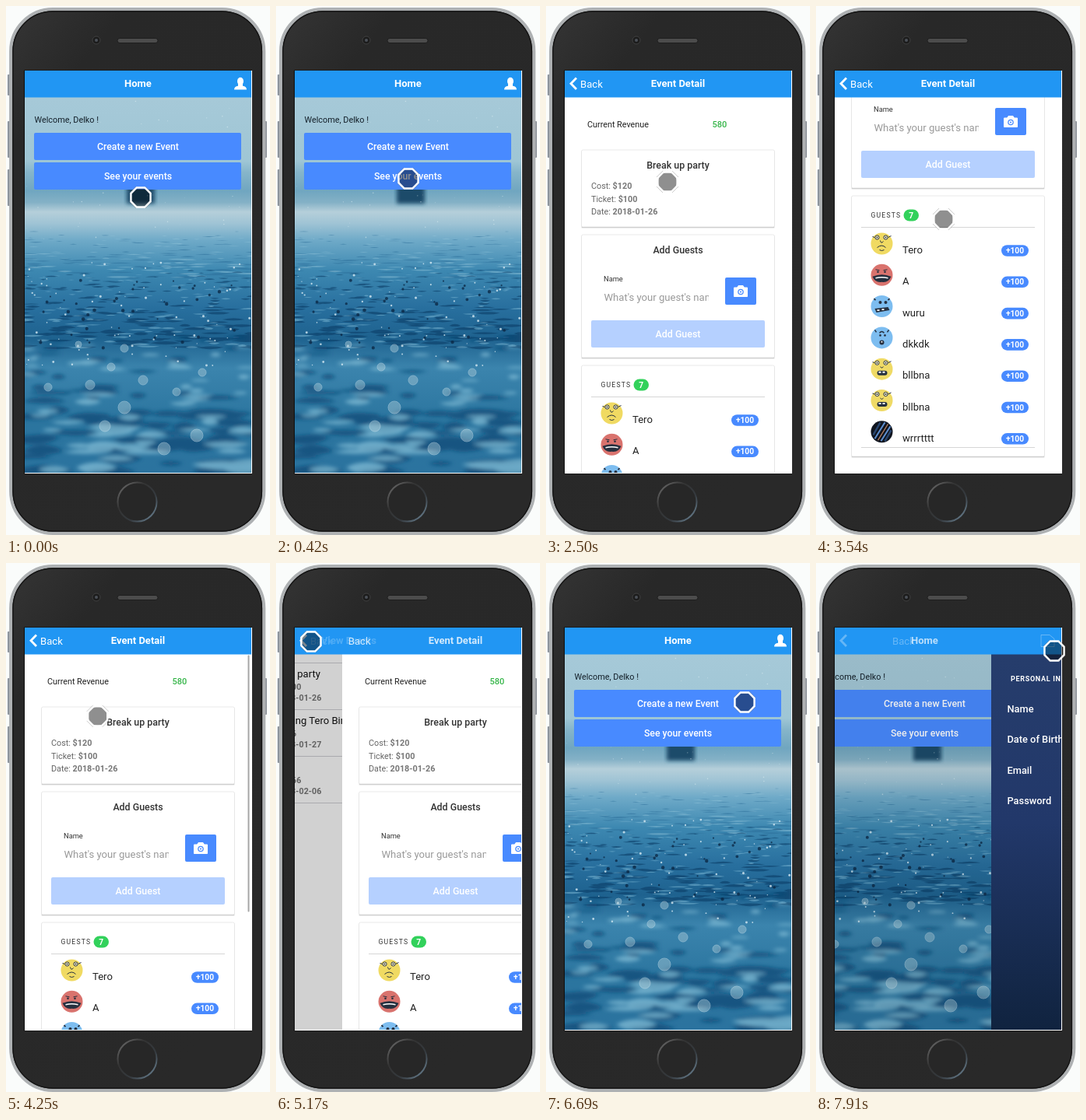
Animation of 339x680 px, one loop 8000 ms. Source, as an HTML page:

```html
<!DOCTYPE html>
<html lang="en">
<head>
<meta charset="utf-8">
<title>Event app</title>
<style>
html, body { margin: 0; width: 100%; height: 100%; overflow: hidden; background: #fafcfb; }
svg { display: block; }
text { font-family: Roboto, "Open Sans", sans-serif; }
</style>
</head>
<body>
<svg id="stage" width="339" height="680" viewBox="0 0 339 680"></svg>
<script>
const BLUE = '#488aff', BAR = '#2196f3', WIDTH = 291;

// ---------- drawing helpers ----------
const text = (x, y, str, size, fill = '#222', weight = 400, extra = '') =>
  `<text x="${x}" y="${y}" font-size="${size}" fill="${fill}" font-weight="${weight}" ${extra}>${str}</text>`;
const mid = (x, y, str, size, fill, weight) => text(x, y, str, size, fill, weight, 'text-anchor="middle"');
const rect = (x, y, w, h, fill, r = 0, extra = '') =>
  `<rect x="${x}" y="${y}" width="${w}" height="${h}" fill="${fill}" rx="${r}" ${extra}/>`;
const circle = (x, y, r, fill, extra = '') => `<circle cx="${x}" cy="${y}" r="${r}" fill="${fill}" ${extra}/>`;
const path = (d, fill, extra = '') => `<path d="${d}" fill="${fill}" ${extra}/>`;
const line = (d, color, width = 1) => path(d, 'none', `stroke="${color}" stroke-width="${width}"`);
const pair = (x, y, label, value) =>
  text(x, y, `${label}: <tspan font-weight="700" fill="#777">${value}</tspan>`, 10.8, '#666');
const stops = list => list.map(([at, color]) => `<stop offset="${at}" stop-color="${color}"/>`).join('');

let seed = 7;
const rand = (a = 0, b = 1) => {
  seed = (seed * 16807) % 2147483647;
  return a + (b - a) * seed / 2147483647;
};
const many = (n, make) => Array.from({ length: n }, make).join('');

// ---------- photo of rain on water ----------
const ripples = (n, y0, y1, width, height) => many(n, () => {
  const x = rand(20, 320), u = rand(), y = y0 + (y1 - y0) * u;
  const w = width * rand(0.4, 1.1) * (0.5 + u), h = height * rand(0.4, 1) * (0.5 + u);
  const tilt = h * rand(-0.5, 0.5);
  return `M${x - w},${y}Q${x},${y - h + tilt} ${x + w},${y}Q${x},${y + h + tilt} ${x - w},${y}`;
});
const dots = (n, y0, y1, r0, r1) => many(n, () => {
  const x = rand(26, 313), y = rand(y0, y1), r = rand(r0, r1);
  return `M${x - r},${y}a${r},${r} 0 1 0 ${2 * r},0a${r},${r} 0 1 0 ${-2 * r},0`;
});
const bokeh = [[152, 516, 8], [127, 540, 7], [203, 569, 8], [245, 552, 8], [108, 487, 6], [252, 471, 5],
  [176, 481, 6], [219, 496, 5], [93, 435, 4], [152, 440, 5], [54, 490, 5], [135, 464, 5]];

const photo = () =>
  rect(24, 117, WIDTH, 484, 'url(#water)') +
  `<g filter="url(#soft)">${rect(155, 208, 36, 46, '#1d4b6b')}</g>` +
  path(dots(60, 122, 300, 0.3, 0.8), '#e8f5f8', 'opacity=".5"') +
  `<g filter="url(#haze)">` +
  path(ripples(90, 290, 350, 13, 1.6), '#2a6d98', 'opacity=".5"') +
  path(ripples(75, 295, 350, 12, 1.6), '#a3cfe2', 'opacity=".4"') +
  path(ripples(150, 340, 440, 14, 3.2), '#0a3c66', 'opacity=".6"') +
  path(ripples(110, 345, 440, 10, 2.2), '#79b4d1', 'opacity=".55"') + '</g>' +
  `<g filter="url(#soft)">` +
  path(ripples(75, 425, 600, 28, 10), '#0d4a77', 'opacity=".75"') +
  path(ripples(60, 430, 600, 24, 9), '#86c0d9', 'opacity=".7"') + '</g>' +
  path(dots(40, 350, 440, 1, 2.4), '#0a2440', 'opacity=".75"') +
  path(dots(75, 330, 465, 0.5, 1.6), '#e0f1f7', 'opacity=".75"') +
  `<g filter="url(#haze)">` + bokeh.map(([x, y, r]) =>
    circle(x, y, r, '#b3cfda', 'opacity=".42" stroke="#e6f3f7"')).join('') + '</g>';

// ---------- pages ----------
const button = (y, label) => rect(36, y, 266, 35, BLUE, 2) + mid(169.5, y + 22, label, 12.3, '#fff', 500);

const homePage = () => photo() + text(36.5, 150, 'Welcome, Delko !', 10.85, '#14202a') +
  button(163, 'Create a new Event') + button(201, 'See your events');

const events = [['Break up party', 100, '2018-01-26'], ['Celebrating Tero Birthday', 66, '2018-01-27'], ['test un', 166, '2018-02-06']];
const listPage = () => rect(24, 117, WIDTH, 484, '#fff') +
  events.map(([name, price, date], i) => {
    const y = 147 + i * 60;
    return text(49, y, name, 13.1, '#111') + pair(49, y + 15.7, 'Ticket', '$' + price) + pair(49, y + 30, 'Date', date);
  }).join('') +
  line('M36 128.5H302M49 188.5H302M49 248.5H302M36 308.5H302', '#cfcfd4');

const INK = '#26303f';
const eyes = circle(-6, -8, 2.6, '#fff8d0', `stroke="${INK}"`) + circle(5, -8, 2.6, '#fff8d0', `stroke="${INK}"`) +
  circle(-6, -8, 1, INK) + circle(5, -8, 1, INK) + line('M-12 -9l3 1M8 -8l4 -2', INK);
const grin = rect(-6, 2, 13, 6, INK, 3) + path('M-4 3h3v2h-3zM1 3h3v2h-3z', '#fff');
const faces = {
  smile: ['#f0da62', eyes + line('M-2 -4q1 5 4 1M-6 5q6 -5 11 0M-3 8q3 2 6 0', INK)],
  wide: ['#d9736e', path('M-12 2Q0 -3 12 2Q9 10 0 9Q-9 10 -12 2', INK) + line('M-8 4q8 -2 16 0', '#fff', 1.6) +
    circle(-5, -4, 1.3, INK) + circle(4, -4, 1.3, INK) + line('M-8 -7l5 1M7 -7l-5 1', INK)],
  teeth: ['#7dbdf0', circle(-2, -5, 2, INK) + circle(5, -5, 2, INK) + line('M-10 -10l2 2M10 -10l-2 2', INK, 1.8) +
    path('M-9 3L8 1L10 5L-7 8z', INK) + line('M-6 5l3 0M0 4l3 0', '#fff', 1.6)],
  gasp: ['#7dbdf0', line('M-9 -10l2 3M9 -10l-2 3M-3 -6q3 -4 6 0', INK, 1.5) + circle(-2, -3, 1.3, INK) +
    circle(4, -3, 1.3, INK) + circle(0, 6, 3, INK) + circle(0, 5.3, 1, '#fff')],
  grin: ['#efda66', eyes + grin + line('M-2 -3q2 3 4 0', INK)],
  night: ['#10151f', line('M-9 9L4 -12M-1 12L11 -7', '#5e8fd0', 2) + line('M-5 11L8 -10', '#c98b68', 1.2) +
    line('M-11 4L-2 -12M4 12L12 -2', '#29466f', 2.4)]
};
const guests = [['Tero', 'smile'], ['A', 'wide'], ['wuru', 'teeth'], ['dkkdk', 'gasp'], ['bllbna', 'grin'], ['bllbna', 'grin'], ['wrrrtttt', 'night']];
const guestRow = ([name, kind], i) => {
  const y = 523.5 + i * 40.3, [skin, face] = faces[kind];
  return `<g transform="translate(84.5 ${y})">${circle(0, 0, 14, skin)}${face}</g>` +
    text(111, y + 12.5, name, 13.1) + rect(238, y + 1.7, 35, 14.6, BLUE, 7.3) +
    mid(255.5, y + 12.6, '+100', 10.2, '#fff', 700);
};
const card = (y, h) => rect(45, y + 0.5, 249, h + 1.5, '#000', 2, 'opacity=".07"') +
  rect(45.5, y, 248, h, '#fff', 2, 'stroke="#e4e4e4" stroke-width=".8"') + line(`M46 ${y + h + 0.5}H293`, '#cfcfcf');
const camera = path('M241.5 362h4l1.5-2.5h6l1.5 2.5h4v11.5h-17z', '#fff', 'stroke="#fff" stroke-linejoin="round"') +
  circle(250, 367.5, 3.8, BLUE) + circle(250, 367.5, 2.5, '#fff') + circle(250, 367.5, 1.1, BLUE);

const detailPage = () => rect(24, 117, WIDTH, 484, '#fff') + '<g id="scroll">' +
  text(53, 156, 'Current Revenue', 10.8) + text(213.5, 156, '580', 11, '#35b548', 500) +
  card(185, 99) + mid(169.5, 209, 'Break up party', 12.4, '#333', 500) +
  pair(58, 235, 'Cost', '$120') + pair(58, 251.7, 'Ticket', '$100') + pair(58, 268.3, 'Date', '2018-01-26') +
  card(294, 158) + mid(169.5, 318, 'Add Guests', 12.4, '#333', 500) +
  text(74, 354, 'Name', 9.3, '#333') +
  `<svg x="74" y="362" width="135" height="24">${text(0.5, 17, "What's your guest's name?", 13.1, '#999')}</svg>` +
  rect(230, 349, 40, 35, BLUE, 2) + camera +
  rect(58, 404, 223, 35, '#b5d0ff', 2) + mid(169.5, 426, 'Add Guest', 12.4, '#fff', 500) +
  card(462, 335) + text(70.5, 490, 'GUESTS', 8.6, '#333', 400, 'letter-spacing="1.2"') +
  rect(112.5, 479.5, 19.5, 15, '#32d15b', 7.5) + mid(122.2, 490.7, '7', 10.2, '#fff', 700) +
  line('M58 502.5H281M58 785.5H281', '#d6d6d6') + guests.map(guestRow).join('') +
  '</g>' + '<rect id="thumb" x="310.5" width="2" height="330" rx="1" fill="#000" opacity=".35"/>';

const profilePage = () => rect(24, 117, WIDTH, 484, 'url(#navy)') +
  text(49, 152, 'PERSONAL INFO', 9, '#fff', 700, 'letter-spacing=".7"') +
  ['Name', 'Date of Birth', 'Email', 'Password'].map((s, i) => text(44.5, 192 + i * 39.4, s, 12.8, '#fff', 500)).join('');

// ---------- navigation: each page slides in at `open` and out at `close` ----------
const pages = {
  home: { title: 'Home', draw: homePage },
  list: { title: 'View Events', draw: listPage, open: 650, close: 5900 },
  detail: { title: 'Event Detail', draw: detailPage, open: 1560, close: 5121 },
  profile: { title: 'Profile', draw: profilePage, open: 7843, close: 9000 }
};
const names = Object.keys(pages);
const body = n => `<g id="${n}">${pages[n].draw()}${rect(24, 117, WIDTH, 484, '#000', 0, `id="${n}-dim"`)}</g>`;
const person = '<g id="person"><ellipse cx="301" cy="96.8" rx="4" ry="5" fill="#fff"/>' +
  path('M293 107.5q0-4 5-4.8v-3h6v3q5 .8 5 4.8z', '#fff') + '</g>';
const bar = n => `<g id="${n}-bar"><g id="${n}-title">${mid(169.5, 104.3, pages[n].title, 13, '#fff', 700)}</g>` +
  (n === 'home' ? person
    : line('M39 92.5L32 99.8L39 107', '#fff', 2.8) + `<g id="${n}-back">${text(44, 104.5, 'Back', 13.1, '#fff')}</g>`) +
  (n === 'profile' ? line('M289 92.5h11l6 5v10h-17z', '#fff') : '') + '</g>';

const octagon = many(8, (_, i) => {
  const a = (i + 0.5) * Math.PI / 4;
  return (i ? 'L' : 'M') + [13.6 * Math.cos(a), 13.6 * Math.sin(a)];
}) + 'z';

const stage = document.getElementById('stage');
stage.innerHTML = `<defs>
  <linearGradient id="water" x2="0" y2="1">${stops([[0, '#a6c9d8'], [.17, '#9fc6d5'], [.2, '#86b5ca'], [.25, '#70a6c0'],
    [.28, '#84b1c6'], [.305, '#b5cfda'], [.335, '#a0c4d5'], [.38, '#6faac8'], [.46, '#3d88b1'], [.56, '#286f9e'],
    [.64, '#1e628f'], [.72, '#3b84ad'], [.86, '#2b759f'], [1, '#2b739f']])}</linearGradient>
  <linearGradient id="navy" x2="0" y2="1">${stops([[0, '#263d6c'], [.45, '#22386a'], [1, '#10233f']])}</linearGradient>
  <linearGradient id="shell" x2=".6" y2="1">${stops([[0, '#353535'], [.12, '#2d2d2d'], [.2, '#282828'], [1, '#292929']])}</linearGradient>
  <linearGradient id="ring" x2="1" y2="1">${stops([[0, '#777'], [.35, '#333'], [.65, '#353a3f'], [1, '#7793a6']])}</linearGradient>
  <filter id="soft"><feGaussianBlur stdDeviation="2.4"/></filter>
  <filter id="haze"><feGaussianBlur stdDeviation=".5"/></filter>
</defs>` +
  rect(2, 88, 4, 27, '#8f959d', 1) + rect(2, 148, 4, 47, '#8f959d', 1) + rect(2, 210, 4, 47, '#8f959d', 1) +
  rect(331, 148, 4, 47, '#8f959d', 1) +
  rect(6.2, 4.2, 325, 673.6, 'url(#shell)', 54, 'stroke="#aeb1b3" stroke-width="4.2"') +
  rect(9, 7, 319.4, 668, 'none', 51, 'stroke="#141414" stroke-width="1.4"') +
  circle(116, 44, 5, '#1c1c1c', 'stroke="#404040"') + circle(116, 44, 2, '#4b5058') +
  rect(143, 41.5, 52, 6, '#4c4c4c', 3, 'stroke="#1d1d1d"') +
  circle(168.5, 637.5, 25, '#272727', 'stroke="url(#ring)" stroke-width="2"') +
  rect(23, 82.5, 293, 519, '#0c0c0c') + rect(24, 83, 292, 518, '#fff') +
  `<svg x="24" y="83" width="${WIDTH}" height="517" viewBox="24 83 ${WIDTH} 517">` +
  rect(24, 83, WIDTH, 518, '#000') + names.map(body).join('') +
  rect(24, 83, WIDTH, 34.5, BAR) + names.map(bar).join('') + '</svg>' +
  `<g id="cursor">${circle(0, 0, 12.2, '#000', 'opacity=".44"')}${path(octagon, 'none', 'stroke="#fff" stroke-width="2.4"')}` +
  path('M-14 -6L-6 -14M6 -14L14 -6M14 6L6 14M-6 14L-14 6', 'none', 'stroke="#888" stroke-width=".7" opacity=".6"') + '</g>';

const parts = {};
stage.querySelectorAll('[id]').forEach(e => parts[e.id] = e);
const shift = (id, x, y = 0) => parts[id].setAttribute('transform', `translate(${x} ${y})`);
const fade = (id, v) => parts[id].setAttribute('opacity', v);

// ---------- timing ----------
const LOOP = 8000;
// screen refreshes: first, last, count
const bursts = [[0, 0, 1], [20, 820, 9], [920, 1320, 5], [1415, 1700, 4], [1800, 2600, 9], [2700, 3200, 6], [3340, 3340, 1],
  [3540, 3540, 1], [3670, 3810, 3], [3950, 4750, 9], [4850, 5170, 5], [5270, 5570, 4], [5670, 6390, 9],
  [6490, 7290, 9], [7390, 7910, 7]];
const ticks = bursts.flatMap(([a, b, n]) => Array.from({ length: n }, (_, i) => n > 1 ? a + (b - a) * i / (n - 1) : a));
const snap = t => ticks.filter(v => v <= t).pop();

const clamp = v => Math.min(1, Math.max(0, v));
const smooth = v => { v = clamp(v); return v * v * (3 - 2 * v); };
// cubic-bezier(.36, .66, .04, 1)
const slide = v => {
  v = clamp(v);
  let lo = 0, hi = 1;
  const curve = (s, a, b) => 3 * a * s * (1 - s) ** 2 + 3 * b * s * s * (1 - s) + s ** 3;
  for (let i = 0; i < 24; i++) {
    const s = (lo + hi) / 2;
    if (curve(s, 0.36, 0.04) < v) lo = s; else hi = s;
  }
  return v === 0 || v === 1 ? v : curve(lo, 0.66, 1);
};

// cursor: time, x, y
const trail = [[0, 173, 246], [350, 170, 222], [750, 170, 222], [1320, 130, 168], [1450, 118, 160], [1650, 118, 160],
  [2500, 156, 226], [2900, 164, 274], [3850, 164, 274], [4750, 53, 89], [4850, 49, 88], [5050, 45, 101],
  [6100, 45, 101], [6690, 255, 179], [6950, 315, 126], [7300, 308, 110], [7500, 306, 113], [LOOP, 306, 113]];
const cursorAt = t => {
  const i = trail.findIndex(p => p[0] > t), a = trail[i - 1], b = trail[i];
  const k = smooth((t - a[0]) / (b[0] - a[0]));
  return [a[1] + (b[1] - a[1]) * k, a[2] + (b[2] - a[2]) * k];
};

function render(t) {
  const enter = { home: 1 };
  for (const n of names.slice(1)) {
    const { open, close } = pages[n];
    enter[n] = slide((t - open) / 500) - slide((t - close) / 500);
  }
  const cover = { home: Math.max(enter.list, enter.profile), list: enter.detail, detail: 0, profile: 0 };
  for (const n of names) {
    const x = Math.round(WIDTH * (1 - enter[n]) - 96 * cover[n]);
    shift(n, x);
    parts[n].style.display = enter[n] > 0 && cover[n] < 1 ? '' : 'none';
    fade(n + '-dim', 0.23 * cover[n]);
    fade(n + '-bar', enter[n] * (1 - cover[n]));
    shift(n + '-title', x);
    if (n !== 'home') shift(n + '-back', (1 - enter[n]) * (t >= pages[n].close ? 233 : 78));
  }
  fade('person', clamp(1 - 3.5 * cover.home));
  const scroll = 218 * (smooth((t - 2620) / 540) - smooth((t - 3540) / 270));
  shift('scroll', 0, -scroll);
  parts.thumb.setAttribute('y', 118.5 + scroll * 150 / 218);
  fade('thumb', (t > 2640 && t < 3340) || (t > 3540 && t < 4400) ? 0.35 : 0);
  shift('cursor', ...cursorAt(t));
}

const start = performance.now();
function loop() {
  render(snap((performance.now() - start) % LOOP));
  requestAnimationFrame(loop);
}
loop();
</script>
</body>
</html>
```
